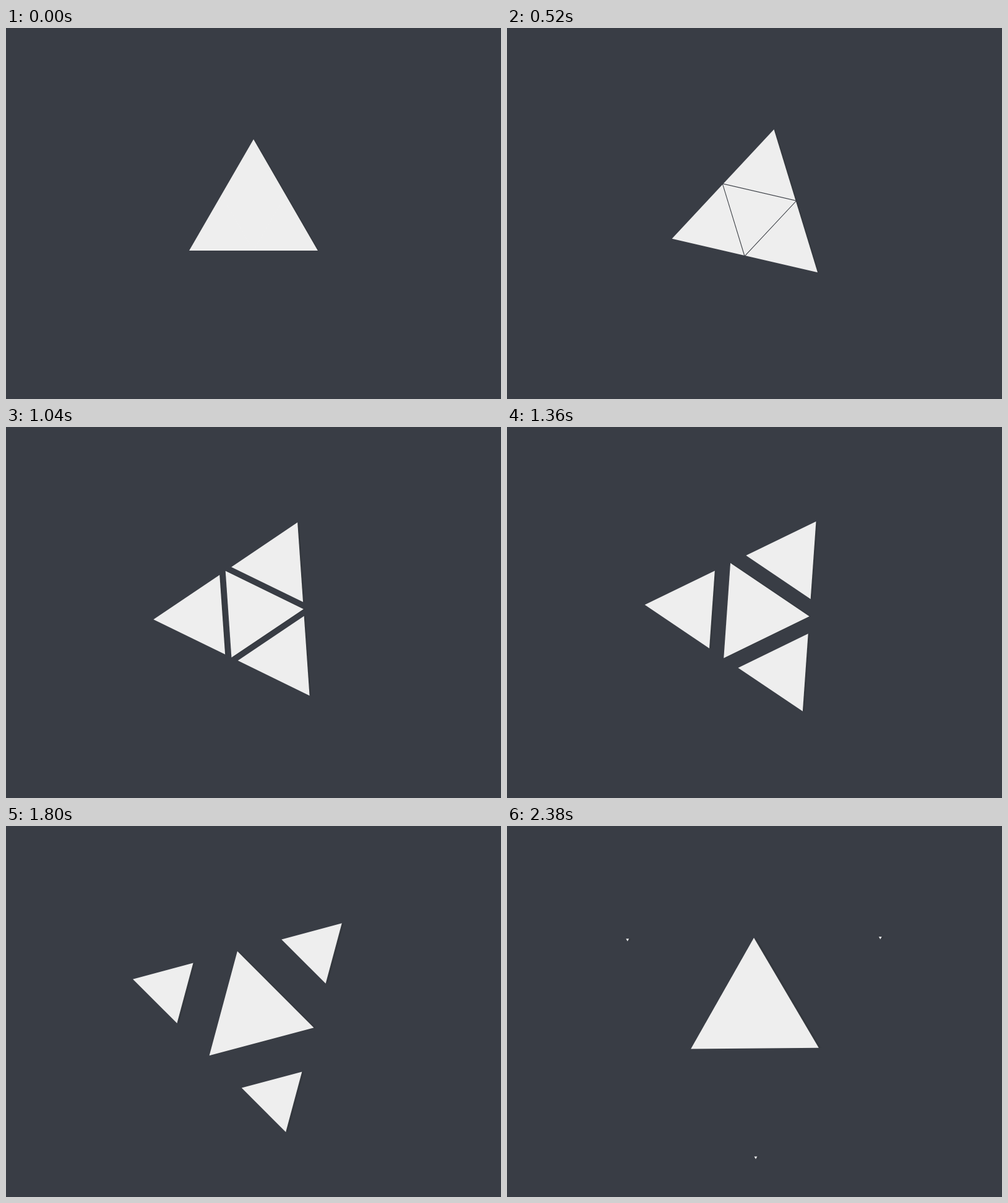
Animation, 800 px wide and 600 px high, one loop 2400 ms. Source, as an HTML page with a canvas:

```html
<!DOCTYPE html>
<html lang="en">
<head>
<meta charset="utf-8">
<title>Unfolding triangle</title>
<style>
  html, body { margin: 0; width: 100%; height: 100%; overflow: hidden; background: #393d45; }
  canvas { display: block; }
</style>
</head>
<body>
<canvas width="800" height="600"></canvas>
<script>
const LOOP = 2400;
const R = 60;
const TURN = Math.PI * 2 / 3;
const ctx = document.querySelector('canvas').getContext('2d');

// Adds an equilateral triangle with centre (x, y), radius r and one vertex at angle a.
function addTriangle(path, x, y, r, a) {
  for (let i = 0; i < 3; i++) {
    const px = x + r * Math.cos(a + i * TURN);
    const py = y + r * Math.sin(a + i * TURN);
    i ? path.lineTo(px, py) : path.moveTo(px, py);
  }
  path.closePath();
}

function triangle(x, y, r, a) {
  const path = new Path2D();
  addTriangle(path, x, y, r, a);
  return path;
}

function draw(t) {
  const zoom = 2 ** t;
  const angle = -Math.PI / 2 + t * Math.PI / 3;
  const r = R * zoom;
  const small = r * (1 - t ** 3);
  const dist = 2 * r - small; // outer tips stay on the large triangle

  const parts = [triangle(400, 300, r, angle + Math.PI)];
  for (let i = 0; i < 3; i++) {
    const a = angle + i * TURN;
    parts.push(triangle(400 + dist * Math.cos(a), 300 + dist * Math.sin(a), small, a));
  }

  ctx.clearRect(0, 0, 800, 600);
  // Additive coverage keeps touching edges seamless.
  ctx.globalCompositeOperation = 'lighter';
  ctx.fillStyle = '#eee';
  parts.forEach(p => ctx.fill(p));

  // Faint shade behind the right-hand edges.
  ctx.globalCompositeOperation = 'destination-over';
  ctx.fillStyle = '#34383e';
  ctx.save();
  ctx.translate(2 * zoom, 0);
  parts.forEach(p => ctx.fill(p));
  ctx.restore();
}

function frame() {
  draw(performance.now() % LOOP / LOOP);
  requestAnimationFrame(frame);
}
frame();
</script>
</body>
</html>
```
